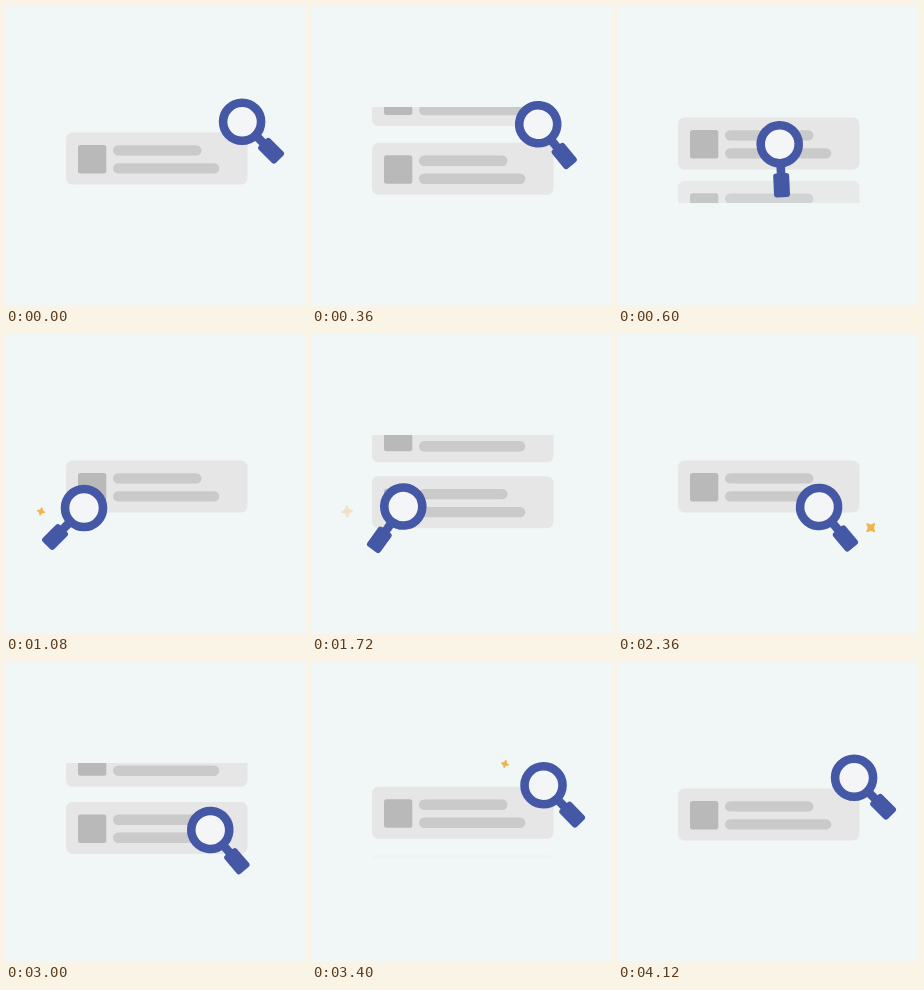
Animation, 300 px wide and 300 px high, one loop 4200 ms. Source, as an HTML page:

```html
<!DOCTYPE html>
<html lang="en">
<head>
<meta charset="utf-8">
<title>Searching</title>
<style>
  html, body { margin: 0; width: 100%; height: 100%; overflow: hidden; background: #f1f6f7; }
  svg { display: block; width: 100vw; height: 100vh; }
</style>
</head>
<body>
<svg viewBox="0 0 300 300">
  <defs>
    <clipPath id="window"><rect x="50" y="101" width="200" height="96"/></clipPath>
    <g id="card">
      <rect x="60" y="126.5" width="181.5" height="52" rx="6.5" fill="#e6e6e6"/>
      <rect x="72" y="139" width="28.3" height="28.5" rx="2.5" fill="#b9b9b9"/>
      <rect x="107" y="139.2" width="88.5" height="10.4" rx="5.2" fill="#cacaca"/>
      <rect x="107" y="157.2" width="106.3" height="10.4" rx="5.2" fill="#cacaca"/>
    </g>
  </defs>
  <g clip-path="url(#window)">
    <use id="leaving" href="#card"/>
    <use id="entering" href="#card"/>
  </g>
  <path id="sparkle" d="M0-5 Q.6-.6 5 0 Q.6 .6 0 5 Q-.6 .6 -5 0 Q-.6-.6 0-5Z"
        fill="#efb64e" stroke="#efb64e" stroke-width="2" stroke-linejoin="round"/>
  <g id="glass">
    <rect x="21" y="-4.3" width="10" height="8.6" fill="#4458a6"/>
    <rect x="29" y="-8" width="24" height="16" rx="3" fill="#4458a6"/>
    <circle r="19" fill="#f3f5f6" stroke="#4458a6" stroke-width="8.6"/>
  </g>
</svg>
<script>
  const LOOP = 4200, STEP = 40, MOVE = 1000;
  const ENTER_LEAD = 145, LEAVE_LEAD = 83;   // cards set off before the glass
  const ENTER_SHIFT = 77.5, LEAVE_SHIFT = 70;

  const right = { x: 236.1, y: 115.8, angle: 45 };
  const left = { x: 78, y: 174, angle: 135 };
  const middle = { x: 201.2, y: 173, angle: 50 };

  const moves = [
    { start: 110, from: right, to: left, bow: 20, sparkle: { at: 1020, x: 35, y: 177.5 } },
    { start: 1420, from: left, to: middle, bow: 14, sparkle: { at: 2180, x: 252.8, y: 193.7 } },
    { start: 2720, from: middle, to: right, bow: 0, sparkle: { at: 3340, x: 193, y: 102 } }
  ];

  const [leaving, entering, sparkle, glass] =
    ['leaving', 'entering', 'sparkle', 'glass'].map(id => document.getElementById(id));

  const clamp = v => Math.min(1, Math.max(0, v));
  const lerp = (a, b, p) => a + (b - a) * p;
  const ease = u => u < 0.5 ? 4 * u ** 3 : 1 - 4 * (1 - u) ** 3;
  const progress = (t, start) => ease(clamp((t - start) / MOVE));
  const place = (el, transform, opacity = 1) => {
    el.setAttribute('transform', transform);
    el.setAttribute('opacity', opacity);
  };

  function drawCards(t, { start }) {
    const enter = progress(t, start - ENTER_LEAD);
    const leave = progress(t, start - LEAVE_LEAD);
    place(entering, `translate(0 ${-ENTER_SHIFT * (1 - enter)})`);
    place(leaving, `translate(0 ${LEAVE_SHIFT * leave})`, 1 - leave ** 4);
  }

  function drawGlass(t, { start, from, to, bow }) {
    const p = progress(t, start);
    const x = lerp(from.x, to.x, p);
    const y = lerp(from.y, to.y, p) - bow * p * (1 - p);
    place(glass, `translate(${x} ${y}) rotate(${lerp(from.angle, to.angle, p)})`);
  }

  function drawSparkle(t) {
    const active = moves.map(m => m.sparkle).filter(s => t >= s.at).pop();
    if (!active) return place(sparkle, '', 0);
    const age = t - active.at;
    const size = 1 - (1 - clamp(age / 180)) ** 3;
    const turn = Math.min(180, age / 4);
    place(sparkle, `translate(${active.x} ${active.y}) rotate(${turn}) scale(${size})`,
      clamp((760 - age) / 200));
  }

  function draw(time) {
    const t = Math.min(LOOP - 2 * STEP, Math.floor(time % LOOP / STEP) * STEP);
    const move = moves.filter(m => t >= m.start - ENTER_LEAD).pop();
    drawCards(t, move);
    drawGlass(t, move);
    drawSparkle(t);
  }

  const origin = performance.now();
  function tick() {
    draw(performance.now() - origin);
    requestAnimationFrame(tick);
  }
  tick();
</script>
</body>
</html>
```
